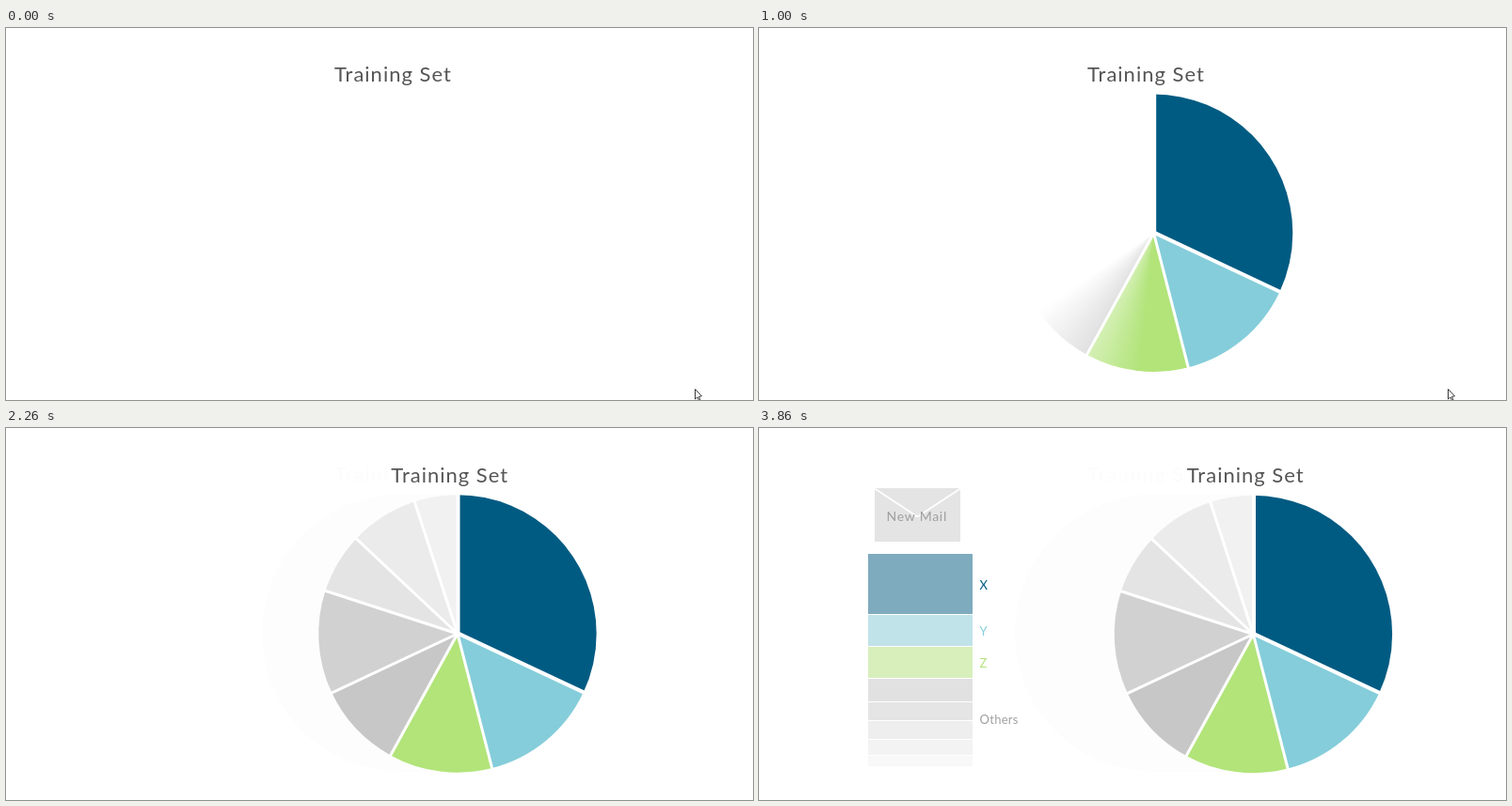
Animation of 794 by 396 pixels, one loop 4.44 s. Source, as an HTML page with a canvas:

```html
<!DOCTYPE html>
<html lang="en">
<head>
<meta charset="utf-8">
<title>Training Set</title>
<style>
  html, body { margin: 0; width: 100%; height: 100%; overflow: hidden; background: #fff; }
  canvas { display: block; width: 794px; height: 396px; }
</style>
</head>
<body>
<canvas id="stage" width="794" height="396"></canvas>
<script>
const ctx = document.getElementById('stage').getContext('2d');
const LOOP = 4440;
const TAU = Math.PI * 2;
const TOP = -Math.PI / 2;
const PIE = { x: 419.6, y: 218.3, r: 147.7 };
const SLICES = [
  [32, '#005b82'], [14, '#85cdda'], [12, '#b2e47a'], [10, '#c7c7c7'],
  [12, '#d1d1d1'], [7, '#e4e4e4'], [8, '#ebebeb'], [5, '#f1f1f1']
];
// bottom edge and colour of each bar
const BARS = [
  [198, '#7fabbe'], [232, '#c0e3e9'], [266, '#d8efbc'], [291, '#e1e1e1'],
  [311, '#e5e5e5'], [331, '#eeeeee'], [348, '#f3f3f3'], [360, '#f8f8f8']
];
const LABELS = [
  ['X', 171.5, '#005b82'], ['Y', 221, '#85cdda'],
  ['Z', 255, '#b2e47a'], ['Others', 314.5, '#a0a0a0']
];

const clamp = v => Math.min(1, Math.max(0, v));
const ease = u => (1 - Math.cos(Math.PI * clamp(u))) / 2;

// The picture advances in 100 ms steps, restarted at each phase
function stepTime(t) {
  const start = [3760, 3300, 1860, 1600, 0].find(s => t >= s);
  return start + Math.floor((t - start) / 100) * 100;
}

function text(str, x, y, size, color, spacing) {
  ctx.font = `${size}px Lato, "Open Sans", sans-serif`;
  ctx.letterSpacing = spacing + 'px';
  ctx.fillStyle = color;
  ctx.fillText(str, x, y);
}

function title(dx, dy, color) {
  text('Training Set', 349 + dx, 57 + dy, 22, color, 1);
}

function pie() {
  const { x, y, r } = PIE;
  let a = TOP;
  for (const [share, color] of SLICES) {
    const end = a + share / 100 * TAU;
    ctx.fillStyle = color;
    ctx.beginPath();
    ctx.moveTo(x, y);
    ctx.arc(x, y, r, a, end);
    ctx.fill();
    a = end;
  }
  ctx.strokeStyle = '#fff';
  a = TOP;
  // the first slice sits slightly apart from the rest
  SLICES.forEach(([share], i) => {
    const apart = i < 2;
    const ox = x + (apart ? 0.6 : 0), oy = y - (apart ? 0.4 : 0);
    ctx.lineWidth = apart ? 4 : 3;
    ctx.beginPath();
    ctx.moveTo(ox, oy);
    ctx.lineTo(ox + Math.cos(a) * (r + 1), oy + Math.sin(a) * (r + 1));
    ctx.stroke();
    a += share / 100 * TAU;
  });
}

// Clockwise wipe with a soft 50 degree edge
function wipe(t) {
  const soft = 50;
  const lead = 144.5 + (Math.min(t, 1400) - 600) * 0.229;
  const from = lead - soft;
  const veil = a => `rgba(255,255,255,${clamp(a)})`;
  const g = ctx.createConicGradient(TOP, PIE.x, PIE.y);
  g.addColorStop(0, veil(-from / soft));
  if (from > 0) g.addColorStop(from / 360, veil(0));
  g.addColorStop(lead / 360, veil(1));
  g.addColorStop(1, veil(1));
  ctx.fillStyle = g;
  ctx.beginPath();
  ctx.arc(PIE.x, PIE.y, PIE.r + 2, 0, TAU);
  ctx.fill();
}

// Faint trail left behind by the sliding chart
function trail(dx) {
  const { x, y, r } = PIE;
  ctx.fillStyle = '#fdfdfd';
  ctx.beginPath();
  ctx.arc(x, y, r, Math.PI / 2, Math.PI * 1.5);
  ctx.lineTo(x + dx, y - r);
  ctx.lineTo(x + dx, y + r);
  ctx.fill();
  ctx.save();
  ctx.beginPath();
  ctx.rect(340, 36, dx + 7, 30);
  ctx.clip();
  title(0, 0, '#fcfcfc');
  ctx.restore();
}

function envelope(alpha) {
  ctx.globalAlpha = alpha;
  ctx.fillStyle = '#e4e4e4';
  ctx.fillRect(123, 64, 91, 57);
  ctx.strokeStyle = '#fff';
  ctx.lineWidth = 1.8;
  ctx.beginPath();
  ctx.moveTo(123, 64.5);
  ctx.lineTo(168.5, 94.5);
  ctx.lineTo(214, 64.5);
  ctx.stroke();
  text('New Mail', 135.5, 99, 14, '#9f9f9f', 0.7);
  ctx.globalAlpha = 1;
}

function bars(alpha) {
  ctx.globalAlpha = alpha;
  let top = 134;
  for (const [bottom, color] of BARS) {
    ctx.fillStyle = color;
    ctx.fillRect(116, top, 111, bottom - top);
    top = bottom + 1;
  }
  for (const [str, y, color] of LABELS) text(str, 234.5, y, 13, color, 0.3);
  ctx.globalAlpha = 1;
}

function cursor(x, y) {
  ctx.save();
  ctx.translate(x, y);
  ctx.beginPath();
  ctx.moveTo(0, 0);
  ctx.lineTo(0, 10.5);
  ctx.lineTo(2.4, 8.4);
  ctx.lineTo(4, 12);
  ctx.lineTo(5.4, 11.4);
  ctx.lineTo(4, 7.8);
  ctx.lineTo(7, 7.4);
  ctx.closePath();
  ctx.fillStyle = '#fff';
  ctx.fill();
  ctx.strokeStyle = '#222';
  ctx.lineWidth = 0.9;
  ctx.stroke();
  ctx.restore();
}

function draw(t) {
  ctx.fillStyle = '#fff';
  ctx.fillRect(0, 0, 794, 396);

  const p = ease((t - 1811) / 824);
  const dx = 105.8 * p, dy = 1.2 * p;
  if (p > 0) trail(dx);
  if (t >= 100) {
    ctx.save();
    ctx.translate(dx, dy);
    pie();
    if (t < 1600) wipe(t);
    ctx.restore();
  }
  title(dx, dy, '#555');

  if (t > 2760) envelope(clamp((t - 2760) / 400));
  if (t >= 3300) bars(clamp(0.24 + 0.76 * (t - 3300) / 460));

  if (t < 1600) cursor(732.5, 384.5);
  else if (t >= 3700 && t < 3860) cursor(757.5, t < 3760 ? 387.5 : 393.5);
}

function tick(now) {
  draw(stepTime(now % LOOP));
  requestAnimationFrame(tick);
}
draw(0);
requestAnimationFrame(tick);
</script>
</body>
</html>
```
